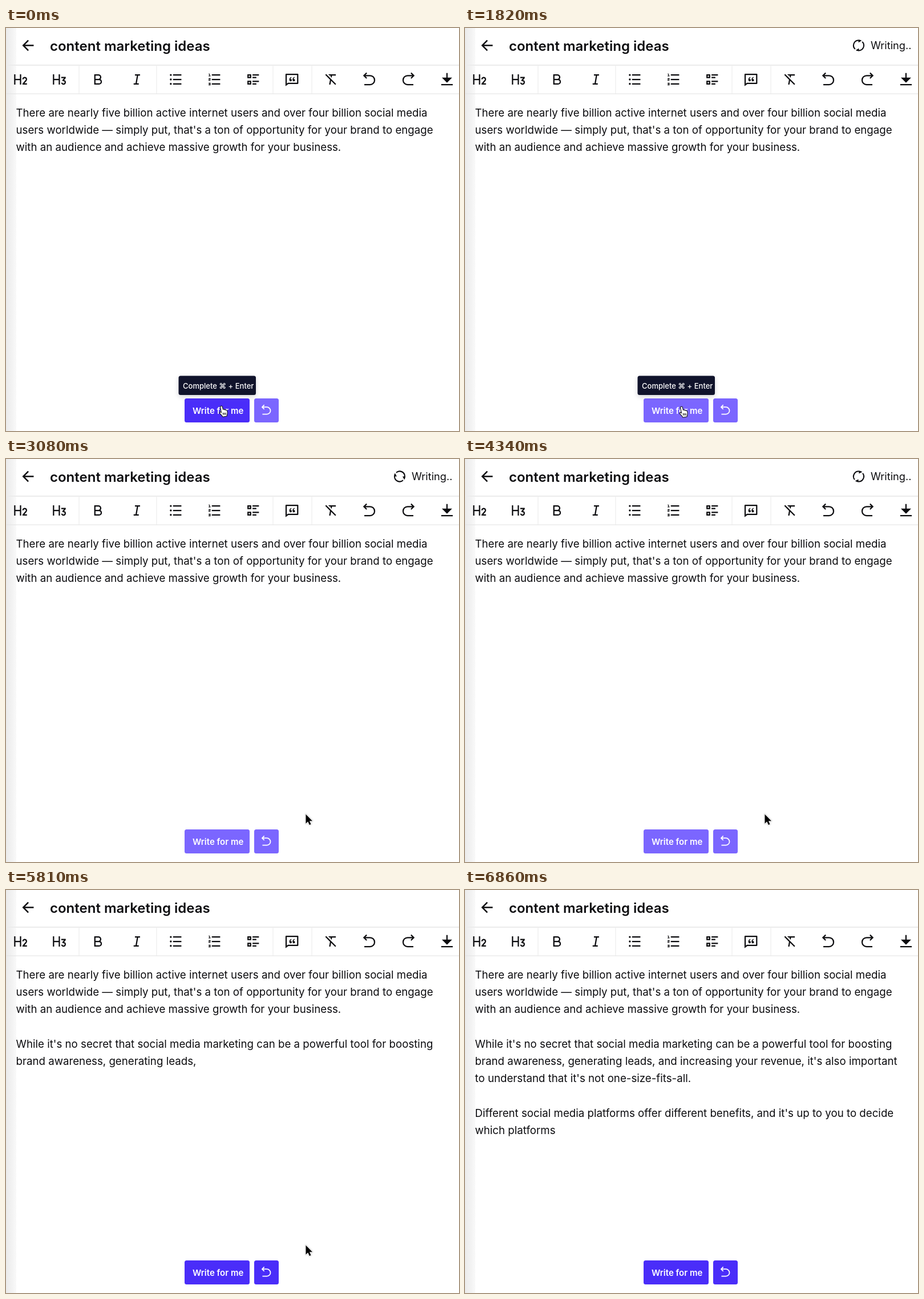
Write an HTML page with a canvas that moves like this. It is 794 px wide and 705 px high and loops after 7140 ms.

```html
<!DOCTYPE html>
<html lang="en">
<head>
<meta charset="utf-8">
<title>Writing assistant</title>
<style>
html, body { margin: 0; width: 100%; height: 100%; overflow: hidden; background: #fff; }
canvas { display: block; width: 794px; height: 705px; }
</style>
</head>
<body>
<canvas id="stage"></canvas>
<script>
const W = 794, H = 705, LOOP = 7140, STEP = 70;
const canvas = document.getElementById('stage');
const ctx = canvas.getContext('2d');
const dpr = window.devicePixelRatio || 1;
canvas.width = W * dpr;
canvas.height = H * dpr;

const INK = '#0c0c0f', DARK = '#4a2df9', LIGHT = '#7b66ff';
const FONT = 'Inter, "DejaVu Sans", sans-serif';

// Icons live on a 24-unit grid
const BARS = 'M8 4h13v2H8zM8 11h13v2H8zM8 18h13v2H8z';
const HEAD = 'M4 4v7h7V4h2v16h-2v-7H4v7H2V4z';
const dot = y => `M4.5 ${y + 1.5}a1.5 1.5 0 1 1 0-3 1.5 1.5 0 0 1 0 3z`;
const quote = x => `M${x} 8.1l.45.69c-1.67.9-1.64 2.35-1.64 2.66.15-.02.32-.03.48-.01a1.76 1.76 0 0 1 1.61 1.74 1.75 1.75 0 0 1-1.75 1.75c-.54 0-1.05-.24-1.37-.59-.52-.55-.79-1.16-.79-2.15 0-1.75 1.23-3.32 3.01-4.09z`;
const ICONS = {
  left: 'M7.83 11H20v2H7.83l5.36 5.36-1.41 1.42L4 12l7.78-7.78 1.41 1.42z',
  h2: HEAD + 'M18.5 8a3.75 3.75 0 0 1 2.98 6.03l-.15.18L18.03 18H22v2h-7v-1.56l4.82-5.54a1.75 1.75 0 1 0-3.07-1.15h-2A3.75 3.75 0 0 1 18.5 8z',
  h3: HEAD + 'M22 8v2l-2.5 2.88a3.75 3.75 0 1 1-4.68 4.34l1.96-.38a1.75 1.75 0 1 0 .93-1.9l-1.31-1.54L19.35 10H15V8z',
  bold: 'M8 11h4.5a2.5 2.5 0 1 0 0-5H8zM18 15.5a4.5 4.5 0 0 1-4.5 4.5H6V4h6.5a4.5 4.5 0 0 1 3.26 7.6A4.5 4.5 0 0 1 18 15.5zM8 13v5h5.5a2.5 2.5 0 1 0 0-5z',
  italic: 'M15 20H7v-2h2.93l2.11-12H9V4h8v2h-2.93l-2.11 12H15z',
  bullets: BARS + dot(5) + dot(12) + dot(18.9),
  numbers: BARS + 'M5 3v3h1v1H3V6h1V4H3V3zM3 14v-2.5h2V11H3v-1h3v2.5H4v.5h2v1zM5 19.5H3v-1h2V18H3v-1h3v4H3v-1h2z',
  checks: 'M11 4h10v2H11zM11 8h6v2h-6zM11 14h10v2H11zM11 18h6v2h-6zM3 4h6v6H3zM5 6v2h2V6zM3 14h6v6H3zM5 16v2h2v-2z',
  quote: 'M6.45 19L2 22.5V4a1 1 0 0 1 1-1h18a1 1 0 0 1 1 1v14a1 1 0 0 1-1 1zM5.76 17H20V5H4v13.38z' + quote(10.96) + quote(15.96),
  clear: 'M12.65 14.07L11.6 20H9.57l1.35-7.66-7.41-7.41L4.93 3.51 20.49 19.07l-1.42 1.41zM11.77 7.53l.27-1.53h-1.8l-2-2H20v2h-5.93l-.57 3.26z',
  undo: 'M5.83 7l2.53 2.54-1.41 1.41L2 6l4.95-4.95 1.41 1.41L5.83 5H13a8 8 0 1 1 0 16H4v-2h9a6 6 0 1 0 0-12z',
  redo: 'M18.17 7H11a6 6 0 1 0 0 12h9v2h-9a8 8 0 1 1 0-16h7.17l-2.53-2.54 1.41-1.41L22 6l-4.95 4.95-1.41-1.41z',
  save: 'M3 19h18v2H3zM13 9h7l-8 8-8-8h7V2h2z',
  refresh: 'M5.46 4.43A9.96 9.96 0 0 1 22 12c0 2.14-.67 4.12-1.81 5.74L17 12h3A8 8 0 0 0 6.46 6.23zM18.54 19.57A9.96 9.96 0 0 1 2 12c0-2.14.67-4.12 1.81-5.74L7 12H4a8 8 0 0 0 13.54 5.77z'
};
for (const k in ICONS) ICONS[k] = new Path2D(ICONS[k]);
const TOOLS = ['h2', 'h3', 'bold', 'italic', 'bullets', 'numbers', 'checks', 'quote', 'clear', 'undo', 'redo', 'save'];

const HAND = new Path2D('M5.2 1.3c1.2-.2 2 .5 2.2 1.5l1 4.6c.8-.7 2.2-.5 2.6.5.9-.6 2.1-.3 2.4.7 1-.4 2 .1 2.2 1.1.6 2.4.9 4.4.1 6.5l-.7 2.8-7 1.2c-1.4-2.6-3.5-4.5-5.6-6.4-.8-.8.1-2.4 1.4-2.1l1.6 1L3.6 3.2c-.2-1 .6-1.8 1.6-1.9z');
const ARROW = new Path2D('M0 0V16.2L3.7 12.7 6.3 18.6 9 17.4 6.5 11.7H11.6z');

const INTRO = [
  'There are nearly five billion active internet users and over four billion social media',
  "users worldwide — simply put, that's a ton of opportunity for your brand to engage",
  'with an audience and achieve massive growth for your business.'
];
const STORY = [
  "While it's no secret that social media marketing can be a powerful tool for boosting",
  "brand awareness, generating leads, and increasing your revenue, it's also important",
  "to understand that it's not one-size-fits-all.",
  '',
  "Different social media platforms offer different benefits, and it's up to you to decide",
  'which platforms'
];
const FULL = STORY.join('\n');
const upTo = word => FULL.indexOf(word) + word.length;

const WRITE_AT = 1400, REPLY_AT = 5460, TIP_OFF = 2520, POINTER_OFF = 6230;
const TYPING = [
  [REPLY_AT, 0], [5810, upTo('leads,')], [6230, upTo('also')],
  [6440, upTo('all.')], [6510, upTo('all.')], [6860, FULL.length]
];
const POINTER = [
  [0, 372, 660], [280, 374, 661], [2100, 374, 661], [2380, 427, 650],
  [2660, 520, 623], [2800, 525.5, 621.5]
];

// Linear interpolation through rows of [time, ...values]
function at(rows, t, col = 1) {
  if (t <= rows[0][0]) return rows[0][col];
  for (let i = 1; i < rows.length; i++) {
    const a = rows[i - 1], b = rows[i];
    if (t <= b[0]) return a[col] + (b[col] - a[col]) * (t - a[0]) / (b[0] - a[0]);
  }
  return rows[rows.length - 1][col];
}

function text(str, x, y, size, weight = 400, color = INK) {
  ctx.font = `${weight} ${size}px ${FONT}`;
  ctx.fillStyle = color;
  ctx.fillText(str, x, y);
}

function icon(name, cx, cy, scale, color = INK, turn = 0) {
  ctx.save();
  ctx.translate(cx, cy);
  ctx.rotate(turn);
  ctx.scale(scale, scale);
  ctx.translate(-12, -12);
  ctx.fillStyle = color;
  ctx.fill(ICONS[name], 'evenodd');
  ctx.restore();
}

function box(x, y, w, h, r, color) {
  ctx.beginPath();
  ctx.roundRect(x, y, w, h, r);
  ctx.fillStyle = color;
  ctx.fill();
}

function rect(x, y, w, h, color) {
  ctx.fillStyle = color;
  ctx.fillRect(x, y, w, h);
}

function page() {
  rect(0, 0, W, H, '#fff');
  const edge = ctx.createLinearGradient(0, 0, 19, 0);
  edge.addColorStop(0, '#ebebeb');
  edge.addColorStop(0.45, '#f1f1f1');
  edge.addColorStop(1, '#fafafa');
  rect(0, 0, 18, H, edge);
  icon('left', 38.5, 30.5, 1.25);
  text('content marketing ideas', 77, 40, 24, 600);
  rect(0, 64, W, 2, '#ececec');
  rect(0, 114.5, W, 1.2, '#e6e6e6');
  for (const x of [127.5, 263.5, 467.5, 535.5]) rect(x, 66, 1, 49, '#e9e9e9');
  TOOLS.forEach((name, i) => icon(name, 25.5 + 67.95 * i, 90, 1.125));
  INTRO.forEach((line, i) => text(line, 17.5, 154.7 + 30.25 * i, 18.7));
}

function story(t) {
  let n = Math.round(at(TYPING, t));
  while (n > 0 && n < FULL.length && !/\s/.test(FULL[n])) n--;
  FULL.slice(0, n).split('\n').forEach((line, i) => text(line, 17.5, 275.9 + 30.25 * i, 18.7));
}

function buttons(t, busy) {
  box(313, 648, 114, 42, 3.5, busy ? LIGHT : DARK);
  box(435, 648, 43, 42, 3.5, t < REPLY_AT ? LIGHT : DARK);
  text('Write for me', 327, 674.5, 15, 600, '#fff');
  icon('undo', 456.5, 668.5, 0.88, '#fff');
  if (t < TIP_OFF) {
    ctx.save();
    ctx.shadowColor = 'rgba(20,20,50,.18)';
    ctx.shadowBlur = 8 * dpr;
    ctx.shadowOffsetY = 3 * dpr;
    box(302.5, 608.5, 135.5, 33.5, 3.5, '#10132b');
    ctx.restore();
    text('Complete ⌘ + Enter', 310, 630.5, 13, 500, '#fff');
  }
}

function pointer(t) {
  if (t >= POINTER_OFF) return;
  const hand = t < TIP_OFF;
  ctx.save();
  ctx.translate(at(POINTER, t, 1), at(POINTER, t, 2));
  ctx.lineJoin = 'round';
  if (hand) {
    ctx.fillStyle = '#fff';
    ctx.strokeStyle = '#111';
    ctx.lineWidth = 1.1;
    ctx.fill(HAND);
    ctx.stroke(HAND);
    ctx.beginPath();
    for (const x of [8.4, 10.6, 12.8]) {
      ctx.moveTo(x, 13);
      ctx.lineTo(x + 0.5, 16.8);
    }
    ctx.stroke();
  } else {
    ctx.strokeStyle = '#fff';
    ctx.lineWidth = 2;
    ctx.shadowColor = 'rgba(0,0,0,.35)';
    ctx.shadowBlur = 2 * dpr;
    ctx.stroke(ARROW);
    ctx.shadowColor = 'transparent';
    ctx.fillStyle = '#000';
    ctx.fill(ARROW);
  }
  ctx.restore();
}

function draw(now) {
  const t = Math.min(Math.floor((now % LOOP) / STEP) * STEP, 6860);
  const busy = t >= WRITE_AT && t < REPLY_AT;
  ctx.setTransform(dpr, 0, 0, dpr, 0, 0);
  page();
  if (busy) {
    icon('refresh', 690, 30.5, 1, INK, (t - 3080) / 1000 * 2 * Math.PI);
    text('Writing..', 711, 37, 18.2);
  }
  if (t > REPLY_AT) story(t);
  buttons(t, busy);
  pointer(t);
}

const start = performance.now();
function tick() {
  draw(performance.now() - start);
  requestAnimationFrame(tick);
}
draw(0);
requestAnimationFrame(tick);
</script>
</body>
</html>
```
